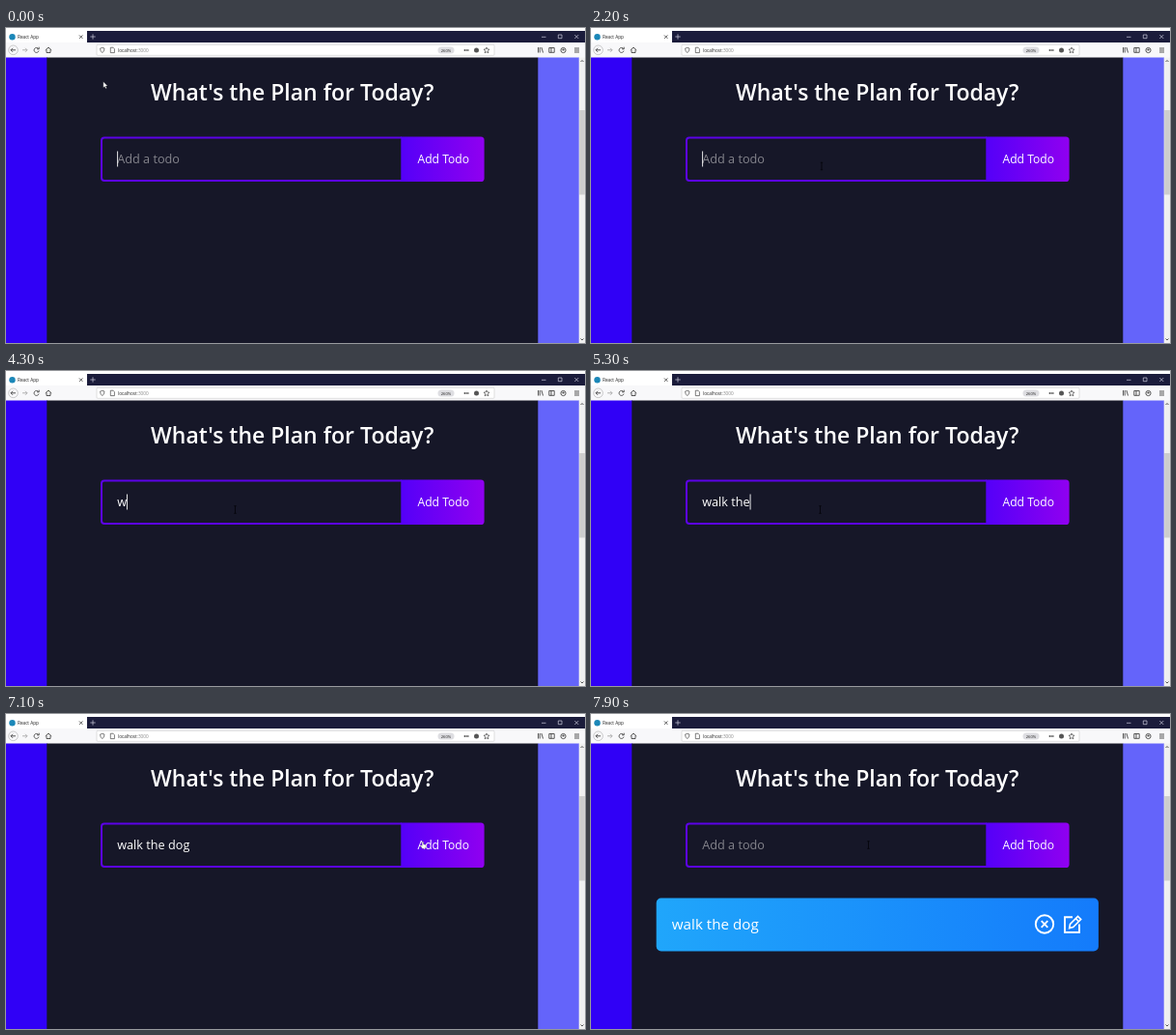
An HTML page that plays this animation: 600x326 px, repeating every 8000 ms.

```html
<!DOCTYPE html>
<html lang="en">
<head>
<meta charset="utf-8">
<title>Todo list</title>
<style>
  html, body { margin: 0; width: 100%; height: 100%; overflow: hidden; background: #fff; }
  svg { display: block; width: 600px; height: 326px; }
  text { font-family: "Open Sans", "Noto Sans", sans-serif; white-space: pre; fill: #fff; }
  .ui { font-size: 4.7px; fill: #222; }
  .line { fill: none; stroke: #444; stroke-width: .9; }
  .thin { fill: none; stroke: #ccd; stroke-width: .7; }
</style>
</head>
<body>
<svg viewBox="0 0 600 326">
  <defs>
    <linearGradient id="violet"><stop stop-color="#5400f8"/><stop offset="1" stop-color="#9000f0"/></linearGradient>
    <linearGradient id="blue"><stop stop-color="#20a6fb"/><stop offset="1" stop-color="#147bfb"/></linearGradient>
  </defs>

  <!-- browser window -->
  <path fill="#1b1c3b" d="M84 3H600V15H84z"/>
  <path fill="#f8f8fa" d="M0 15H600V30.5H0z"/>
  <circle cx="6.5" cy="9.3" r="3.2" fill="#1b87b8"/>
  <text class="ui" x="12" y="11.2">React App</text>
  <path class="line" d="M76 7.5l3.4 3.4m0-3.4l-3.4 3.4"/>
  <path class="thin" d="M87.3 9H92.7M90 6.3V11.7M555 9.3H559.5M572.3 7H576V10.7H572.3zM589.3 7l4 4m0-4l-4 4"/>
  <circle class="line" cx="7.5" cy="22.8" r="4.8" style="stroke:#aaa;stroke-width:.6"/>
  <path class="line" d="M10 22.8H5M7 20.8l-2 2 2 2"/>
  <path class="line" d="M17 22.8H22M20 20.8l2 2-2 2" style="stroke:#aaa"/>
  <path class="line" d="M33.6 21.4A2.5 2.5 0 1 0 34 23.6M34.2 19.7V21.8H32"/>
  <path class="line" d="M40.8 23l3.2-3 3.2 3M42 22.5V25.5H46V22.5"/>
  <rect x="94" y="17.3" width="412" height="11" rx="1" fill="#fff" stroke="#ccc" stroke-width=".6"/>
  <path class="line" d="M99.8 20.3l2.2.8q0 3.2-2.2 4.5-2.2-1.3-2.2-4.5z" style="stroke-width:.7"/>
  <path class="line" d="M108.3 20.2H111L112.4 21.7V25.6H108.3z" style="stroke-width:.7"/>
  <text class="ui" x="116" y="24.7">localhost<tspan fill="#888">:3000</tspan></text>
  <rect x="447.5" y="19.5" width="17" height="7" rx="3.5" fill="#dedee2"/>
  <text class="ui" x="456" y="24.6" text-anchor="middle" style="font-size:4.2px">260%</text>
  <path d="M474.7 23h4.8" stroke="#333" stroke-width="1.4" stroke-dasharray="1.3 .5"/>
  <circle cx="487.5" cy="23" r="2.5" fill="#555"/>
  <path class="line" d="M498 20l.9 2 2.1.2-1.6 1.5.5 2.1-1.9-1.1-1.9 1.1.5-2.1-1.6-1.5 2.1-.2z" style="stroke-width:.7"/>
  <path class="line" d="M551.5 20V25.5M553.2 20V25.5M554.9 20l1.6 5.5M562.8 20.5H568.2V25.3H562.8zM565 20.5V25.3"/>
  <circle class="line" cx="577.5" cy="23" r="2.6"/>
  <circle cx="577.5" cy="22.5" r="1.1" fill="#444"/>
  <path class="line" d="M589 21H594M589 23H594M589 25H594"/>

  <!-- page -->
  <path fill="#3000f6" d="M0 30.5H43V326H0z"/>
  <path fill="#6464fa" d="M551 30.5H594V326H551z"/>
  <path fill="#161728" d="M42.3 30.5H551.3V326H42.3z"/>
  <path fill="#f0f0f0" d="M593.7 30.5H600V326H593.7z"/>
  <path fill="#cdcdcd" d="M594.2 85H599.8V172.5H594.2z"/>
  <path class="line" d="M595.5 35l1.5-1.5 1.5 1.5M595.5 321.5l1.5 1.5 1.5-1.5"/>
  <text x="296.7" y="75.3" text-anchor="middle" font-size="23" font-weight="600">What's the Plan for Today?</text>

  <path d="M410 113.5H102q-3 0-3 3V155q0 3 3 3H410" fill="none" stroke="#5c02e8" stroke-width="2"/>
  <path d="M409.3 112.5H492q3.6 0 3.6 3.6V155.4q0 3.6-3.6 3.6H409.3z" fill="url(#violet)"/>
  <text x="453.3" y="140" text-anchor="middle" font-size="12.1">Add Todo</text>
  <text id="entry" x="115.2" y="140" font-size="12.7"></text>
  <path id="caret" d="M0 127.5V143.5" stroke="#fff" stroke-width=".9"/>

  <g id="card">
    <rect x="67.7" y="190.5" width="458.2" height="55" rx="5" fill="url(#blue)"/>
    <text x="83.8" y="223.2" font-size="15.2">walk the dog</text>
    <g fill="none" stroke="#fff" stroke-width="1.9">
      <circle cx="470" cy="217.5" r="9.2"/>
      <path d="M466.7 214.2l6.6 6.6m0-6.6l-6.6 6.6"/>
      <path d="M499 210.3H491V226H506V217.5"/>
      <path d="M495.7 221.6l.8-4.2 8-8 3.2 3.2-8 8zM502.3 211.6l3.2 3.2" stroke-width="1.6"/>
    </g>
  </g>

  <g id="pointer">
    <path id="arrow" d="M0 0V6.3L1.5 5 2.5 7.2 3.6 6.7 2.6 4.6H4.5z" fill="#fff" stroke="#111" stroke-width=".3"/>
    <path id="beam" d="M-1.2-3.8H1.2M0-3.8V3.8M-1.2 3.8H1.2" stroke="#05050c" stroke-width=".9"/>
    <path id="hand" d="M-.8-3.2q.8-.8 1.4 0V-.8L2.6-.3Q3.4 0 3.2 1L2.7 3.7H-.8L-2.6.6q.4-.9 1.2-.1l.6.5z" fill="#fff" stroke="#222" stroke-width=".3"/>
  </g>
</svg>
<script>
  const $ = id => document.getElementById(id);
  const show = (id, on) => $(id).style.display = on ? "" : "none";

  const LOOP = 8000, CLICK = 7000, SUBMIT = 7200;
  const phrase = "walk the dog";
  const keyTimes = [4300, 4400, 4600, 4700, 4900, 5100, 5200, 5300, 5500, 5600, 5700, 5900];
  // time, x, y
  const path = [
    [0, 100.8, 55.5], [1300, 76.5, 107], [1500, 76.5, 107], [2200, 239, 143],
    [3300, 237.5, 143.5], [6300, 237.5, 143.5], [7000, 432, 135.5],
    [7200, 432, 135.5], [7900, 287.5, 135.5]
  ];

  function pointerAt(t) {
    const next = path.findIndex(p => p[0] > t);
    if (next < 0) return path[path.length - 1].slice(1);
    const [t0, x0, y0] = path[next - 1], [t1, x1, y1] = path[next];
    const u = (t - t0) / (t1 - t0), k = u * u * (3 - 2 * u);
    return [x0 + (x1 - x0) * k, y0 + (y1 - y0) * k];
  }

  function draw(t) {
    const submitted = t >= SUBMIT;
    const typed = submitted ? 0 : keyTimes.filter(k => k <= t).length;
    const entry = $("entry");
    entry.textContent = typed ? phrase.slice(0, typed) : "Add a todo";
    entry.style.fill = typed ? "#fff" : "#84848c";

    const lastKey = typed ? keyTimes[typed - 1] : 0;
    const caretX = 115.6 + (typed ? entry.getComputedTextLength() : 0);
    $("caret").setAttribute("transform", `translate(${caretX})`);
    show("caret", t < CLICK && (t - lastKey) % 1000 < 500);
    show("card", submitted);

    const [x, y] = pointerAt(t);
    const inRow = y > 112 && y < 159;
    const kind = inRow && x > 98 && x < 409 ? "beam" : inRow && x >= 409 && x < 496 ? "hand" : "arrow";
    for (const id of ["arrow", "beam", "hand"]) show(id, id === kind);
    $("pointer").setAttribute("transform", `translate(${x} ${y})`);
  }

  function tick() {
    const t = performance.now() % LOOP;
    draw(Math.floor(t / 100) * 100);
    requestAnimationFrame(tick);
  }
  tick();
</script>
</body>
</html>
```
